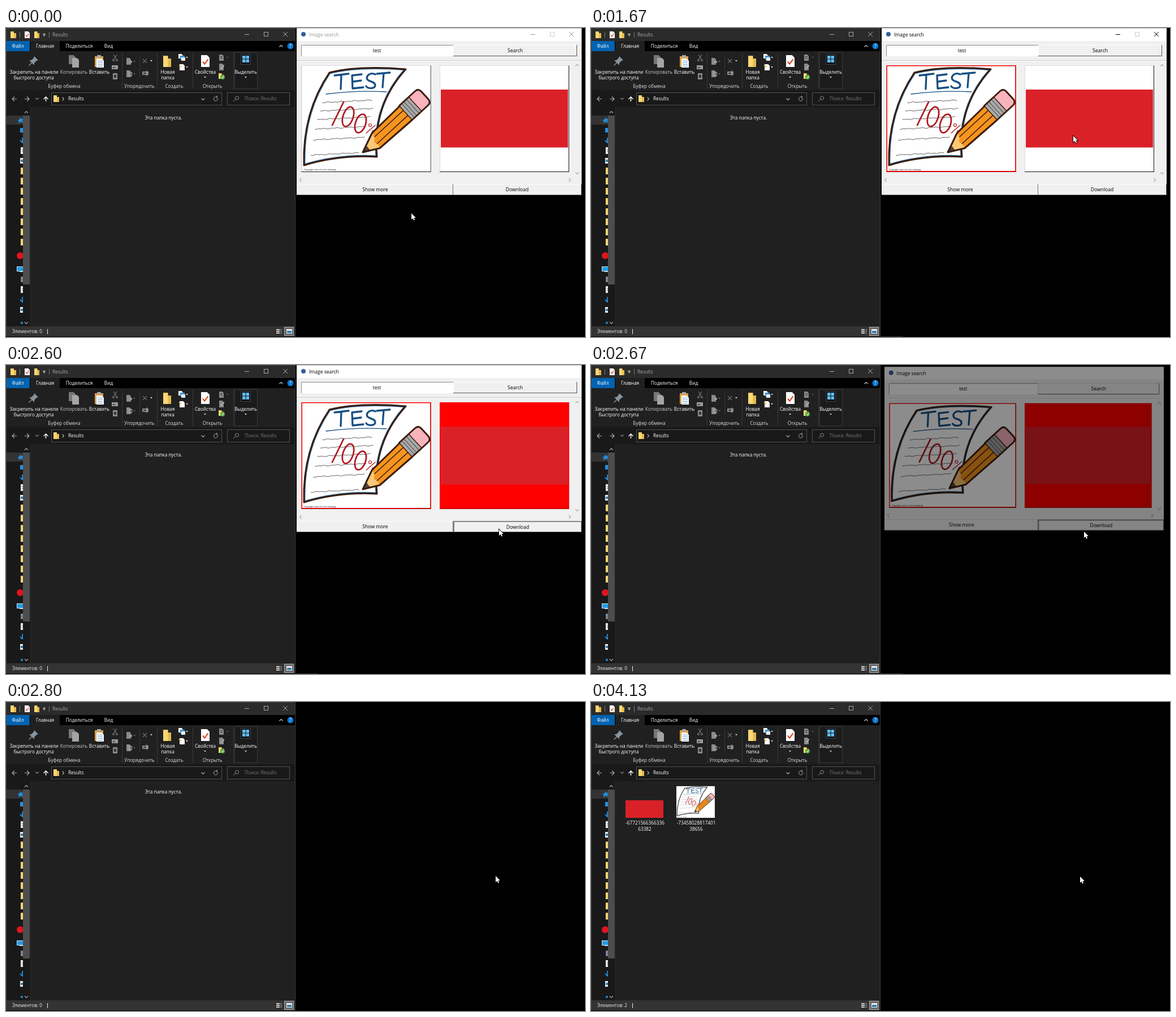
Write an HTML page with a canvas that moves like this. It is 1024 by 547 pixels and loops after 5270 ms.

```html
<!DOCTYPE html>
<html lang="ru">
<head>
<meta charset="utf-8">
<title>Image search</title>
<style>
html, body { margin: 0; height: 100%; overflow: hidden; background: #000; }
canvas { display: block; }
</style>
</head>
<body>
<canvas id="stage" width="1024" height="547"></canvas>
<script>
const g = document.getElementById('stage').getContext('2d');
const STEP = 200 / 3, LOOP = 5270;
const YELLOW = '#f8d775', BLUE = '#2490e0', GREY = '#8a8a8a', FACE = '#f0f0f0';

// Pointer stops: step, x, y
const pointer = [
  [0, 717, 328], [3, 802, 402], [4, 813, 412], [5, 810, 401], [7, 810, 401],
  [15, 651, 187], [19, 651, 187], [25, 853, 191], [27, 862, 193], [28, 862, 193],
  [34, 873, 297], [35, 872, 291], [39, 872, 291], [40, 872, 295], [42, 866, 308],
  [43, 866, 309], [44, 866, 309], [45, 865, 309], [79, 865, 309]
];

function rect(x, y, w, h, color) {
  g.fillStyle = color;
  g.fillRect(x, y, w, h);
}
function frame(x, y, w, h, color) {
  g.strokeStyle = color;
  g.lineWidth = 1;
  g.strokeRect(x + .5, y + .5, w - 1, h - 1);
}
function line(d, color, width = 1) {
  g.strokeStyle = color;
  g.lineWidth = width;
  g.stroke(new Path2D(d));
}
function shape(d, color) {
  g.fillStyle = color;
  g.fill(new Path2D(d));
}
function disc(x, y, r, color) {
  g.fillStyle = color;
  g.beginPath();
  g.arc(x, y, r, 0, 7);
  g.fill();
}
function ring(x, y, rx, ry, turn, color, width) {
  g.strokeStyle = color;
  g.lineWidth = width;
  g.beginPath();
  g.ellipse(x, y, rx, ry, turn, 0, 7);
  g.stroke();
}
function text(s, x, y, color = '#fff', align = 'center', size = 8.25) {
  g.font = size + 'px "Open Sans", "Noto Sans", sans-serif';
  g.textAlign = align;
  g.fillStyle = color;
  g.fillText(s, x, y);
}
function chevron(x, y, dx, dy, color) {
  const d = dx ? `M${x - dx} ${y - 3}L${x + dx} ${y}L${x - dx} ${y + 3}`
               : `M${x - 3} ${y - dy}L${x} ${y + dy}L${x + 3} ${y - dy}`;
  line(d, color, 1.2);
}
const caret = (x, y, color = '#ddd') => shape(`M${x - 2} ${y - 1}h4l-2 2.5z`, color);

function folder(x, y, w, h) {
  shape(`M${x} ${y}h${w * .6}v${h * .25}h${w * .4}v${h * .75}h${-w}z`, '#e5b94e');
  rect(x, y + 1, w * .6, h - 1, YELLOW);
}
function page(x, y, w, h, color = '#eee') {
  shape(`M${x} ${y}h${w * .7}l${w * .3} ${w * .3}V${y + h}h${-w}z`, color);
}
function checkedPage(x, y, w, h) {
  page(x, y, w, h, '#fff');
  line(`M${x + w * .2} ${y + h * .55}l${w * .22} ${h * .2}l${w * .4} ${-h * .4}`, '#d8431f', w / 7);
}
function windowButtons(x, y, gap, color, middle) {
  line(`M${x} ${y + .5}h8`, color);
  frame(x + gap, y - 4, 8, 8, middle);
  line(`M${x + 2 * gap} ${y - 4}l8 8m0 -8l-8 8`, color);
}

function ribbon() {
  rect(0, 41, 511, 69, '#202020');
  [205, 267, 330, 402].forEach(x => rect(x, 44, 1, 64, '#3a3a3a'));
  rect(236, 48, 1, 40, '#383838');
  rect(404, 43, 41, 65, '#1b1b1b');
  frame(404, 43, 41, 65, '#383838');

  shape('M50 50l7 7-3 1-4 4v4l-4-4-5 5-1-1 5-5-4-4h4l4-4z', '#8795a0');
  page(111, 48, 12, 16, '#777');
  page(117, 53, 12, 17, '#a5a5a5');
  rect(157, 50, 15, 19, '#dca24a');
  rect(161, 48, 7, 4, '#aaa');
  page(160, 54, 13, 16, '#fff');
  for (let y = 58; y < 68; y += 3) rect(162, y, 9, 1, '#6da4d6');
  line('M190 47l5 8m1 -8l-5 8', GREY);
  ring(190, 57, 1.5, 1.5, 0, GREY, 1);
  ring(196, 57, 1.5, 1.5, 0, GREY, 1);
  rect(187, 66, 11, 7, '#999');
  line('M189 69l1 2 1-2 1 2 1-2', '#222', .8);
  rect(189, 80, 8, 11, GREY);
  rect(191, 83, 4, 5, '#333');

  page(213, 53, 8, 12, GREY);
  page(213, 75, 8, 12, GREY);
  line('M218 60h5m-2 -2l2 2-2 2', '#ccc');
  frame(217, 78, 6, 7, '#aaa');
  line('M242 55l7 7m0 -7l-7 7', '#666', 1.5);
  rect(241, 77, 11, 6, GREY);
  rect(243, 79, 5, 2, '#333');
  line('M249 75v10', '#aaa');
  caret(227, 59, '#666');
  caret(227, 81, '#666');
  caret(257, 58);

  folder(278, 49, 14, 20);
  page(305, 46, 8, 8, '#fff');
  rect(308, 49, 8, 7, '#3c91d0');
  rect(310, 52, 7, 6, '#eee');
  page(307, 64, 9, 11, '#fff');
  line('M306 66l4 3', '#e2b04c', 2);
  caret(320, 52);
  caret(320, 69);

  checkedPage(345, 48, 15, 21);
  page(377, 47, 8, 11, GREY);
  rect(379, 50, 4, 1, '#333');
  rect(379, 53, 4, 1, '#333');
  page(377, 63, 8, 12, GREY);
  line('M380 72l6 -6', '#bbb', 1.5);
  folder(376, 80, 9, 10);
  disc(383, 87, 4, '#53a83f');
  line('M381 87l2 2 2 -4', '#fff');
  caret(392, 52, '#555');
  caret(352, 87);
  rect(415, 46, 18, 19, '#101418');
  frame(415, 46, 18, 19, '#39444c');
  for (const x of [418, 424.5]) for (const y of [49, 55.5]) rect(x, y, 5.5, 5.5, '#63bdf3');
  caret(424, 87);

  text('Закрепить на панели', 49.5, 81);
  text('быстрого доступа', 49, 91);
  text('Копировать', 120, 81, '#c4c4c4');
  text('Вставить', 165, 81);
  text('Новая', 286, 81);
  text('папка', 286, 91);
  text('Свойства', 352.5, 81);
  text('Выделить', 424, 81);
  [['Буфер обмена', 103], ['Упорядочить', 236], ['Создать', 297.5], ['Открыть', 365]]
    .forEach(([s, x]) => text(s, x, 106, '#ddd'));
}

function navigation() {
  rect(0, 140, 44, 388, '#191919');
  rect(1, 155, 29, 16, '#333');
  g.save();
  g.beginPath();
  g.rect(0, 140, 30, 388);
  g.clip();
  shape('M20 163l4-1 1-4 2 3 4-1-2 4 1 4-4-2-4 3 1-4z', BLUE);
  rect(25, 177, 8, 8, BLUE);
  for (const y of [199, 481]) line(`M29 ${y - 5}v9m-4 -4l4 4 4-4`, BLUE, 1.8);
  for (const y of [217, 463]) {
    page(26, y - 6, 8, 12);
    rect(28, y - 2, 4, 1, '#58a');
    rect(28, y + 1, 4, 1, '#58a');
  }
  for (const y of [235, 499]) {
    rect(25, y - 5, 9, 10, '#eee');
    rect(26, y - 2, 7, 4, '#357fae');
  }
  for (let y = 253; y < 380; y += 18) folder(26, y - 6, 9, 12);
  disc(25, 403, 6, '#e1141c');
  rect(19, 422, 13, 9, '#bfe5ff');
  rect(20, 423, 12, 7, '#259be5');
  rect(24, 431, 8, 1, '#ccc');
  rect(26, 440, 7, 10, '#777');
  rect(27, 442, 2, 2, '#67a9ff');
  rect(27, 446, 2, 2, '#b388d5');
  disc(28, 522, 2, BLUE);
  g.restore();
  rect(30, 155, 12, 299, '#4d4d4d');
  chevron(36, 149, 0, -1.5, '#aaa');
  chevron(36, 522, 0, 1.5, '#aaa');
  rect(43, 140, 1, 388, '#2b2b2b');
}

function explorer(step) {
  rect(0, 0, 512, 546, '#202020');
  rect(0, 0, 511, 23, '#2b2b2b');
  folder(8, 6, 10, 12);
  checkedPage(33, 6, 9, 12);
  folder(50, 6, 9, 12);
  rect(24, 7, 1, 10, '#777');
  rect(76, 7, 1, 10, '#777');
  rect(65, 10, 5, 1, '#ddd');
  caret(67.5, 13);
  text('Results', 82, 15, '#aaa', 'left');
  windowButtons(422, 11, 34, '#aaa', '#aaa');

  rect(0, 23, 511, 18, '#000');
  rect(1, 23, 41, 18, '#0063b1');
  rect(43, 23, 52, 18, '#202020');
  [['Файл', 21], ['Главная', 69], ['Поделиться', 129.5], ['Вид', 181.5]]
    .forEach(([s, x]) => text(s, x, 35));
  chevron(486.5, 32, 0, -1.5, '#ccc');
  disc(503, 32, 5.5, '#0a78d4');
  text('?', 503, 35);
  ribbon();

  rect(0, 110, 511, 30, '#191919');
  line('M19 125.5h-8m4 -4l-4 4 4 4', '#aaa', 1.2);
  line('M33 125.5h8m-4 -4l4 4-4 4', '#aaa', 1.2);
  chevron(55, 125, 0, 1.2, '#888');
  line('M70.5 130v-8m-4 4l4 -4 4 4', '#fff', 1.4);
  frame(80, 114, 302, 23, '#535353');
  folder(84, 119, 10, 12);
  chevron(101, 125.5, 1.2, 0, '#ccc');
  text('Results', 110, 128, '#fff', 'left');
  chevron(348.5, 126, 0, 1.5, '#aaa');
  line('M374 124a3.5 3.5 0 1 1-3-2h3m-2 -2l2 2-2 2', '#aaa');
  frame(391, 114, 111, 23, '#535353');
  ring(408.5, 124, 3, 3, 0, '#888', 1);
  line('M406 126l-4 4', '#888');
  text('Поиск: Results', 422, 128, '#777', 'left');
  navigation();

  rect(0, 528, 511, 18, '#333');
  text('Элементов: ' + (step < 57 ? 0 : 2), 11, 540, '#eee', 'left');
  rect(73, 533, 1, 9, '#eee');
  for (let y = 533; y < 542; y += 3) {
    rect(478, y, 6, 2, '#ccc');
    rect(485, y, 3, 2, '#777');
  }
  rect(492, 529, 17, 16, '#666');
  frame(492, 529, 17, 16, '#aaa');
  rect(496, 533, 10, 8, '#eee');
  rect(497, 536, 8, 4, '#357fae');
  line('M.5 0V546M511.5 0V546M0 .5H512', '#3c3c3c');

  if (step < 54) text('Эта папка пуста.', 278.5, 162);
  else files(step);
}

function files(step) {
  if (step < 62) {
    for (const x of [75, 166]) {
      page(x, 152, 39, 52, '#f4f4f4');
      rect(x + 6, 171, 27, 20, '#3f9bd8');
    }
  } else {
    rect(61, 174, 67, 31, '#da2128');
    g.save();
    g.translate(151, 149);
    g.scale(.298, .298);
    g.translate(-523, -67);
    rect(523, 67, 228, 188, '#fff');
    examSheet();
    g.restore();
  }
  text('-67721566366336', 95.5, 217);
  text('63382', 95, 228);
  text('-73458028817401', 186, 217);
  text('38656', 186, 228);
}

function pencil() {
  const brown = '#3b1d0c';
  const cap = 'V-17H141Q149 -17 149 -9V9Q149 17 141 17H';
  g.save();
  g.translate(631, 220);
  g.rotate(-.744);
  const body = `M0 0L35 -14 103 -16${cap}103L27 15Z`;
  shape(body, '#f6941f');
  shape('M0 0L35 -14 33 -5 27 0 29 7 27 15Z', '#fbc875');
  shape('M0 0L13 -5.5 12 7Z', '#4b4545');
  shape(`M126 17${cap}126Z`, '#f9b3bd');
  rect(103, -16, 23, 32, '#aaa');
  line('M34 -6L103 -6M29 6L103 6M103 -16V16M126 -16V16', brown, 1.5);
  line('M109 -16V16M114 -16V16M120 -16V16', '#555', 1.2);
  line(body, brown, 3);
  g.restore();
}

function examSheet() {
  const sheet = new Path2D('M572 79Q625 66 707 73Q648 138 656 228Q590 224 527 243Q524 150 572 79Z');
  const blue = '#164f83', red = '#b01920';
  g.lineJoin = g.lineCap = 'round';
  g.fillStyle = '#fff';
  g.fill(sheet);
  g.save();
  g.clip(sheet);
  g.strokeStyle = '#2a70a8';
  g.lineWidth = 5;
  g.stroke(sheet);
  g.restore();
  g.strokeStyle = '#3b1d0c';
  g.lineWidth = 3;
  g.stroke(sheet);

  line('M581 84L606 81M593 83L592 108M629 82L612 84 613 107 632 105M613 95L628 93' +
    'M653 82C645 78 636 84 639 91C643 96 652 94 653 101C653 108 640 108 637 103' +
    'M656 81L679 79M668 80L666 105', blue, 3.3);
  line('M566 117Q620 110 673 113', blue, 1.3);
  [[560, 132, 648], [556, 147, 652], [551, 162, 645], [547, 179, 640], [544, 198, 635], [540, 225, 626]]
    .forEach(([x, y, end]) => {
      let d = `M${x} ${y}`;
      for (let u = x; u < end; u += 3) d += `L${u} ${y - (u - x) * .05 + Math.sin(u * .4 + y) * Math.sin(u * .13)}`;
      line(d, '#666', 1);
    });
  line('M597 131L577 172', red, 2.8);
  ring(605, 157, 9, 18, .32, red, 2.7);
  ring(627, 169, 9, 17, .32, red, 2.7);
  line('M653 172L637 186', red, 1.3);
  ring(644, 172, 2.5, 2.5, 0, red, 1.2);
  ring(650, 184, 2.5, 2.5, 0, red, 1.2);
  pencil();
  text('Copyright notice for this drawing', 527, 252, '#200', 'left', 3.7);
  g.lineJoin = 'miter';
  g.lineCap = 'butt';
}

function raised(x, y, w, h, fill, dark = '#333') {
  rect(x, y, w, h, dark);
  rect(x, y, w - 1, h - 1, '#fff');
  rect(x + 1, y + 1, w - 2, h - 2, fill);
}
function pictureButton(x, selected, fill) {
  raised(x, 66, 229, 189, fill, selected ? '#500' : '#111');
  if (selected) line(`M${x + .75} 66.75h227.5v187h-227.5z`, '#f00', 1.5);
  else line(`M${x + .5} 254V66.5h228`, '#ddd');
}

function searchWindow(step) {
  const active = step >= 20, ink = active ? '#000' : '#999';
  const pressed = step >= 36;
  rect(514, .5, 504, 295.5, FACE);
  rect(514, .5, 504, 22.5, '#fff');
  disc(526, 11, 4, '#315f9d');
  text('Image search', 536, 15, ink, 'left', 8.5);
  if (step < 39) windowButtons(928, 11, 34, ink, '#ccc');

  rect(522, 30, 269, 20, '#fff');
  line('M522.5 50V30.5H791', '#888');
  text('test', 656, 43, '#000');
  raised(791, 30, 219, 20, FACE, '#555');
  text('Search', 900.5, 43, '#000', 'center', 8.6);
  rect(514, 57, 504, 1, '#c8c8c8');
  rect(514, 58, 504, 1, '#fff');

  pictureButton(522.5, active, '#fff');
  examSheet();
  pictureButton(767, step >= 28, step >= 28 ? '#f00' : '#fff');
  rect(769, 109, 225, 102.5, '#da2128');

  chevron(1010, 66, 0, -1.5, '#aaa');
  chevron(1010, 257, 0, 1.5, '#aaa');
  chevron(521, 269, -1.5, 0, '#aaa');
  chevron(997, 269, 1.5, 0, '#aaa');
  raised(514, 276, 277, 20, FACE, '#666');
  raised(791, 276, 227, 20, FACE, '#666');
  const shift = pressed ? 1 : 0;
  if (pressed) line('M792 296V277H1017', '#666', 1.5);
  text('Show more', 653, 289, '#000', 'center', 8.6);
  text('Download', 904 + shift, 289 + shift, '#000', 'center', 8.6);
}

function closingWindow(step) {
  const left = 42 - step;
  if (left <= 0) return;
  const scale = [0, .955, .98][left] || 1;
  g.save();
  g.translate(765.5, 148);
  g.scale(scale, scale);
  g.translate(-765.5, -148);
  searchWindow(step);
  if (left < 3) rect(512, 0, 507, 298, `rgba(0,0,0,${left === 2 ? .45 : .8})`);
  g.restore();
}

function drawPointer(step) {
  const i = pointer.findIndex(p => p[0] > step);
  const [s0, x0, y0] = pointer[i - 1], [s1, x1, y1] = pointer[i];
  const u = (step - s0) / (s1 - s0), k = u * u * (3 - 2 * u);
  const arrow = 'M0 0V11L2.6 8.7L4.3 12.4L6 11.7L4.4 8H7.8Z';
  g.save();
  g.translate(Math.round(x0 + (x1 - x0) * k), Math.round(y0 + (y1 - y0) * k));
  line(arrow, '#000', 1.6);
  shape(arrow, '#fff');
  g.restore();
}

function draw(now) {
  const step = Math.min(78, Math.floor((now % LOOP + 5) / STEP));
  rect(0, 0, 1024, 547, '#000');
  explorer(step);
  if (step >= 20 && step < 42) rect(512, 546, 40, 1, '#333');
  closingWindow(step);
  drawPointer(step);
}

let start;
function tick(now) {
  start ??= now;
  draw(now - start);
  requestAnimationFrame(tick);
}
requestAnimationFrame(tick);
</script>
</body>
</html>
```
